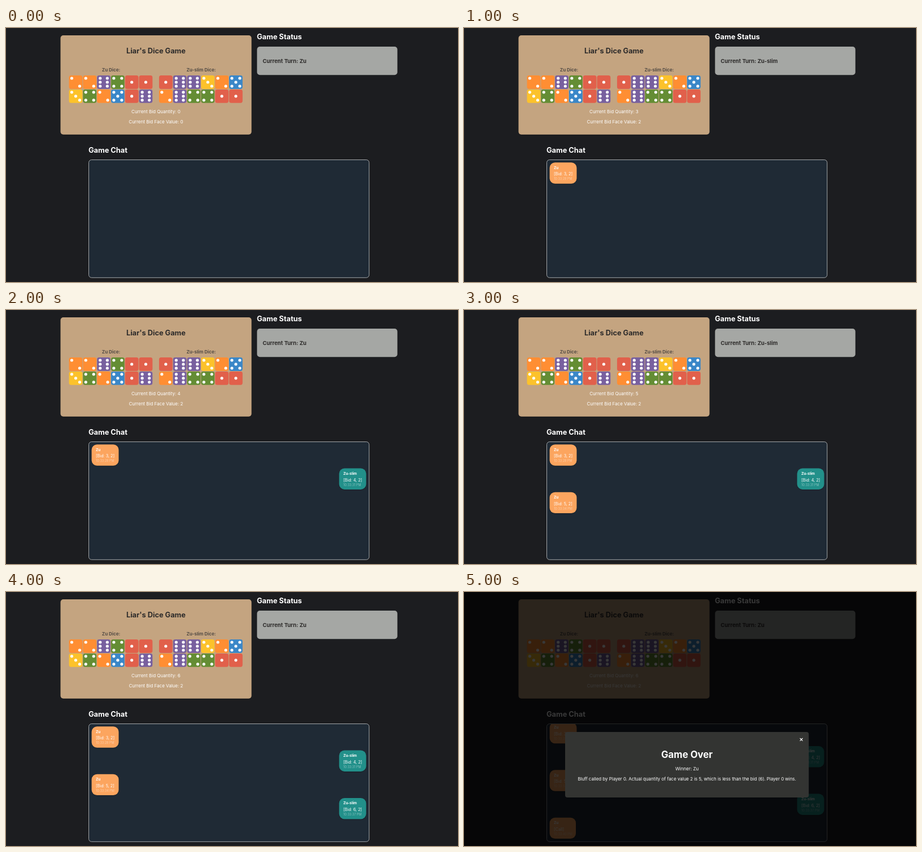
Write an HTML page that moves like this. It is 800x450 px and loops after 6 s.

```html
<!DOCTYPE html>
<html lang="en">
<head>
<meta charset="utf-8">
<title>Liar's Dice Game</title>
<style>
html, body { margin: 0; width: 100%; height: 100%; overflow: hidden; background: #1c1d20; }
svg { display: block; width: 100%; height: 100%; font-family: Inter, sans-serif; }
text { fill: #fff; white-space: pre; }
.b { font-weight: 700; }
.mid { text-anchor: middle; }
.dark { fill: #2d2b2a; }
.label { fill: #544c45; }
.time { fill-opacity: .45; }
</style>
</head>
<body>
<svg viewBox="0 0 800 450">
  <defs>
    <clipPath id="view"><rect x="147" y="234" width="495.5" height="208" rx="4"/></clipPath>
    <filter id="soft" x="-10%" y="-10%" width="120%" height="130%">
      <feDropShadow dx="0" dy="1" stdDeviation="1.2" flood-opacity=".22"/>
    </filter>
  </defs>
  <rect width="800" height="450" fill="#1c1d20"/>
  <rect x="96.5" y="13" width="338" height="175.7" rx="5" fill="#c4a480" filter="url(#soft)"/>
  <text class="b mid dark" x="265.4" y="45" font-size="12.8">Liar's Dice Game</text>
  <g class="b mid" font-size="8">
    <text class="label" x="186" y="76.6" id="nameA"></text>
    <text class="label" x="345.4" y="76.6" id="nameB"></text>
  </g>
  <g id="dice"></g>
  <g class="mid" font-size="8">
    <text x="265.4" y="151" id="quantity"></text>
    <text x="265.4" y="169" id="face"></text>
  </g>
  <text class="b" x="444" y="20" font-size="12.8">Game Status</text>
  <rect x="444.3" y="33" width="248.4" height="50.3" rx="5" fill="#a5a7a4"/>
  <text class="b dark" x="454.2" y="61.7" font-size="9.6" id="turn"></text>
  <text class="b" x="146" y="220.5" font-size="12.8">Game Chat</text>
  <rect x="146.5" y="233.5" width="496.2" height="208.8" rx="5" fill="#1f2a35" stroke="#b4b6b8" stroke-width=".9"/>
  <g clip-path="url(#view)"><g id="chat"></g></g>
  <g id="modal">
    <rect width="800" height="450" opacity=".78"/>
    <rect x="179" y="248" width="431.2" height="116" rx="4" fill="#333432"/>
    <path d="M594.6 259l4.8 4.8m0-4.8l-4.8 4.8" stroke="#fff" stroke-width="1.1"/>
    <g class="mid">
      <text class="b" x="394.6" y="294" font-size="16.8">Game Over</text>
      <text x="394.6" y="316.4" font-size="8" id="winner"></text>
      <text x="394.6" y="334.3" font-size="7.9">Bluff called by Player 0. Actual quantity of face value 2 is 5, which is less than the bid (6). Player 0 wins.</text>
    </g>
  </g>
</svg>
<script>
const $ = id => document.getElementById(id);
const STEP = 1000, LOOP = 6000;
const players = ['Zu', 'Zu-slim'];
const colors = ['#e1604b', '#ff8e33', '#fcc22b', '#648d34', '#3a87c8', '#78609f'];
const hands = [['226411', '342516'], ['166325', '264411']];
const seconds = [28, 31, 34, 37, 40];

function add(parent, tag, attrs, content = '') {
  const el = document.createElementNS('http://www.w3.org/2000/svg', tag);
  for (const key in attrs) el.setAttribute(key, attrs[key]);
  el.textContent = content;
  parent.append(el);
  return el;
}

function pips(n) {
  const d = n === 6 ? 6.3 : 7;
  const list = n % 2 ? [[0, 0]] : [];
  if (n > 1) list.push([-d, -7], [d, 7]);
  if (n > 3) list.push([d, -7], [-d, 7]);
  if (n === 6) list.push([-d, 0], [d, 0]);
  return list;
}

function drawDie(n, cx, cy) {
  add($('dice'), 'rect', { x: cx - 11.9, y: cy - 11.9, width: 23.8, height: 23.8, rx: 3.6, fill: colors[n - 1] });
  for (const [dx, dy] of pips(n))
    add($('dice'), 'circle', { cx: cx + dx, cy: cy + dy, r: 2.6, fill: '#fff' });
}

function drawBubble(i) {
  const who = i % 2, last = i === seconds.length - 1;
  const width = last ? 46.4 : 47.8;
  const x = who ? 637.4 - width : 151.6;
  const g = add($('chat'), 'g', { transform: `translate(${x} ${238.3 + i * 42.2})` });
  add(g, 'rect', { width, height: 37.4, rx: 9.5, fill: who ? '#24908a' : '#fca55e', filter: 'url(#soft)' });
  add(g, 'text', { class: 'b', x: 7.5, y: 11.3, 'font-size': 6.4 }, players[who]);
  add(g, 'text', { x: 7.5, y: 23.1, 'font-size': 7.2 }, last ? '[Call]' : `[Bid: ${i + 3}, 2]`);
  add(g, 'text', { class: 'time', x: 7.5, y: 31, 'font-size': 5.5 }, `10:33:${seconds[i]} PM`);
  return g;
}

hands.forEach((rows, h) => rows.forEach((row, r) => [...row].forEach((n, c) =>
  drawDie(+n, 123.4 + h * 159.4 + c * 24.8, 96 + r * 24.8))));
const bubbles = seconds.map((_, i) => drawBubble(i));
$('nameA').textContent = players[0] + ' Dice:';
$('nameB').textContent = players[1] + ' Dice:';
$('winner').textContent = 'Winner: ' + players[0];

let shown = -1;
function render(time) {
  const step = Math.floor(time % LOOP / STEP);
  if (step !== shown) {
    shown = step;
    const over = step === 5;
    const bids = Math.min(step, 4);
    $('quantity').textContent = 'Current Bid Quantity: ' + (bids && bids + 2);
    $('face').textContent = 'Current Bid Face Value: ' + (bids && 2);
    $('turn').textContent = 'Current Turn: ' + players[bids % 2];
    bubbles.forEach((b, i) => b.setAttribute('display', i < step ? 'inline' : 'none'));
    $('chat').setAttribute('transform', `translate(0 ${over ? -7.4 : 0})`);
    $('modal').setAttribute('display', over ? 'inline' : 'none');
  }
}

const start = performance.now();
function tick() {
  render(performance.now() - start);
  requestAnimationFrame(tick);
}
render(0);
requestAnimationFrame(tick);
</script>
</body>
</html>
```
